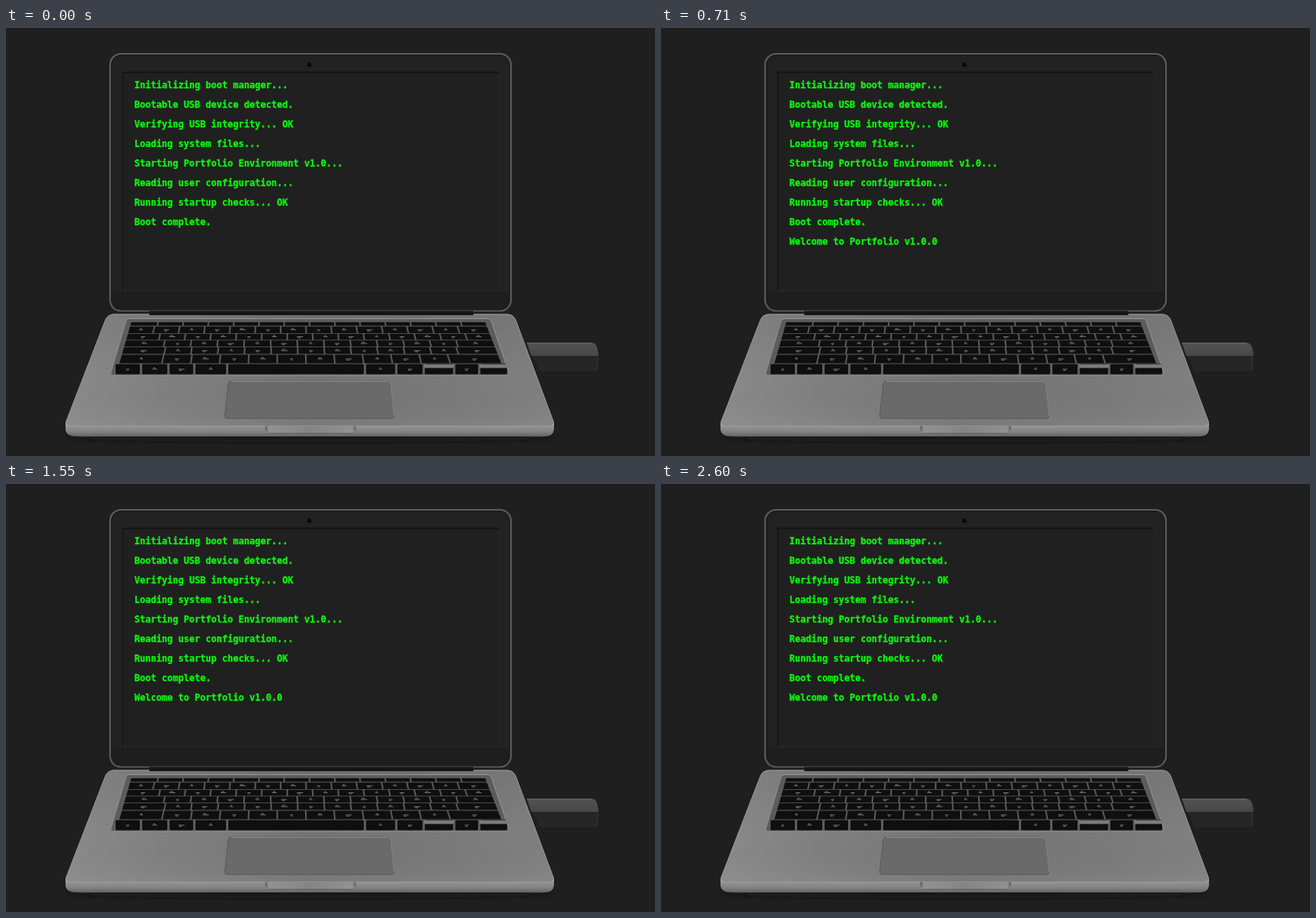
Recreate the animation shown at these times as an HTML page. Size 829x547 px, loop 2680 ms.

```html
<!DOCTYPE html>
<html lang="en">
<head>
<meta charset="utf-8">
<title>Boot screen</title>
<style>
html, body { margin: 0; width: 100%; height: 100%; overflow: hidden; background: #1f1f1f; }
svg { display: block; width: 829px; height: 547px; }
#console text {
  font: bold 11.63px "DejaVu Sans Mono", "Liberation Mono", monospace;
  fill: #0cf80c;
  stroke: #0cf80c;
  stroke-width: .3;
  white-space: pre;
}
</style>
</head>
<body>
<svg viewBox="0 0 829 547" xmlns="http://www.w3.org/2000/svg">
  <defs>
    <linearGradient id="metal">
      <stop offset="0" stop-color="#8a8a8a"/>
      <stop offset=".2" stop-color="#808080"/>
      <stop offset=".5" stop-color="#747474"/>
      <stop offset=".8" stop-color="#7a7a7a"/>
      <stop offset="1" stop-color="#818181"/>
    </linearGradient>
    <linearGradient id="shade" x2="0" y2="1">
      <stop offset="0" stop-color="#000" stop-opacity=".06"/>
      <stop offset=".6" stop-color="#000" stop-opacity="0"/>
      <stop offset="1" stop-color="#fff" stop-opacity=".05"/>
    </linearGradient>
    <linearGradient id="front" x2="0" y2="1">
      <stop offset="0" stop-color="#b0b0b0"/>
      <stop offset=".3" stop-color="#929292"/>
      <stop offset=".7" stop-color="#808080"/>
      <stop offset="1" stop-color="#626262"/>
    </linearGradient>
    <linearGradient id="notch">
      <stop offset="0" stop-color="#5d5d5d"/>
      <stop offset=".04" stop-color="#929292"/>
      <stop offset=".5" stop-color="#848484"/>
      <stop offset=".96" stop-color="#929292"/>
      <stop offset="1" stop-color="#5d5d5d"/>
    </linearGradient>
    <linearGradient id="stick" x2="0" y2="1">
      <stop offset="0" stop-color="#545454"/>
      <stop offset="1" stop-color="#474747"/>
    </linearGradient>
    <filter id="blur" x="-10%" y="-200%" width="120%" height="500%">
      <feGaussianBlur stdDeviation="4"/>
    </filter>
    <path id="deck" d="M138 365.5H640Q648 365.5 651 373L700 504V511H76V504L127 373Q130 365.5 138 365.5Z"/>
  </defs>

  <rect width="829" height="547" fill="#1f1f1f"/>
  <ellipse cx="388" cy="522" rx="315" ry="4" fill="#141414" filter="url(#blur)"/>

  <g id="usb">
    <path d="M672 417H757V433Q757 439 750 439H682Z" fill="#262626"/>
    <path d="M755 418V437" stroke="#343434"/>
    <path d="M660 402H747Q753 402 755 408L757 417Q757 419 754 419H670Z" fill="url(#stick)"/>
    <path d="M666 402.500H748" stroke="#666"/>
    <path d="M662 402H665L671 419H668Z" fill="#202020"/>
  </g>

  <g id="lid">
    <rect x="133" y="33" width="512" height="328.5" rx="14" fill="#222" stroke="#5a5a5a" stroke-width="2.2"/>
    <rect x="135" y="35" width="508" height="325" rx="12" fill="none" stroke="#161616"/>
    <path d="M136 337H642V350Q642 360 632 360H146Q136 360 136 350Z" fill="#1e1e1e"/>
    <rect x="149" y="56.500" width="481" height="279" fill="#202020" stroke="#292929"/>
    <path d="M149 336V56.500H630" fill="none" stroke="#121212" stroke-width="1.3"/>
    <circle cx="387.500" cy="47" r="2.700" fill="#080808"/>
  </g>

  <g id="base">
    <use href="#deck" fill="url(#metal)"/>
    <use href="#deck" fill="url(#shade)"/>
    <path d="M76.500 504L127 373Q130 366 138 366H640Q648 366 651 373L699.500 504" fill="none" stroke="#969696"/>
    <path d="M183 361.500H597V367H183Z" fill="#161616"/>
    <path d="M76 504Q77 508 84 508H693Q699 508 700 504V513Q699 522 688 522H90Q77 522 76 513Z" fill="url(#front)"/>
    <path d="M331 508.500H447V512Q446 518 438 518H340Q332 518 331 512Z" fill="url(#notch)"/>
    <path d="M336 518H442" stroke="#5c5c5c"/>
    <path d="M158 371.500H615Q619 371.500 620 375L642 440Q643 444 639 444H137Q133 444 134 440L153 375Q154 371.500 158 371.500Z" fill="#5c5c5c" stroke="#959595"/>
    <path d="M288 451H488Q491 451 491.500 454L496 495Q496 499 492 499H283Q279 499 279.500 495L284 454Q284.500 451 288 451Z" fill="#6a6a6a" stroke="#545454" stroke-width=".8"/>
    <path d="M288 451.500H488Q491 451.500 491.500 454L496 496" fill="none" stroke="#999" stroke-width=".8"/>
  </g>
  <g id="keys"></g>
  <g id="console"></g>
</svg>
<script>
const LOOP = 2680, WELCOME_AT = 710;
const NS = "http://www.w3.org/2000/svg";
const keys = document.getElementById("keys");
const terminal = document.getElementById("console");

function add(parent, tag, attrs) {
  const el = document.createElementNS(NS, tag);
  for (const k in attrs) el.setAttribute(k, attrs[k]);
  parent.appendChild(el);
  return el;
}

// Well edges lean outward toward the viewer.
const leftAt = y => 159 - (y - 376) * 19 / 66;
const rightAt = y => 613 + (y - 376) * 26 / 66;

// Draws a key between fractions a and b of the row; returns its centre.
function key(a, b, y, h) {
  const at = (u, v) => leftAt(v) + u * (rightAt(v) - leftAt(v));
  const pt = (u, v, d) => (at(u, v) + d).toFixed(1) + " " + v;
  add(keys, "path", {
    d: `M${pt(a, y, 1)}L${pt(b, y, -1)}L${pt(b, y + h, -1)}L${pt(a, y + h, 1)}Z`,
    fill: "#0f0f0f"
  });
  return (at(a, y + h / 2) + at(b, y + h / 2)) / 2;
}

function legend(x, y, n) {
  const w = 4 + n * 2 % 5;
  add(keys, "path", {
    d: `M${x - w / 2} ${y}h${w}m${-w + 1} ${n % 2 ? -1.5 : 1.5}h${w / 2}`,
    stroke: "#808080", "stroke-width": .9, fill: "none"
  });
}

// Each row: top, height, key count, first and last key width in units.
const rows = [
  [376, 4.6, 14, 1.1, 1], [381.5, 8.4, 14, 1, 1.2], [390.7, 7.7, 14, 1.3, 1],
  [399.2, 8, 13, 1.5, 1.4], [408, 8.6, 13, 1.6, 1.5], [417.4, 11, 12, 1.5, 1.8]
];
rows.forEach(([y, h, count, first, last], r) => {
  const total = count - 2 + first + last;
  let u = 0;
  for (let i = 0; i < count; i++) {
    const w = (i === 0 ? first : i === count - 1 ? last : 1) / total;
    const x = key(u, u + w, y, h);
    if (r) legend(x, y + h / 2, i + r * 3);
    u += w;
  }
});

const bottom = [[140, 171], [174, 206], [209, 239], [242, 281], [284, 457],
  [460, 497], [500, 532], [535, 571], [574, 603], [606, 640]];
bottom.forEach(([a, b], i) => {
  add(keys, "rect", { x: a, y: 429.5, width: b - a, height: 13, rx: 1.5, fill: "#0f0f0f" });
  if (i === 7 || i === 9)
    add(keys, "rect", { x: a - 1, y: 430, width: b - a + 2, height: 4.5, fill: "#7c7c7c" });
  else if (i !== 4) legend((a + b) / 2, 436, i);
});

const lines = [
  "Initializing boot manager...",
  "Bootable USB device detected.",
  "Verifying USB integrity... OK",
  "Loading system files...",
  "Starting Portfolio Environment v1.0...",
  "Reading user configuration...",
  "Running startup checks... OK",
  "Boot complete.",
  "Welcome to Portfolio v1.0.0"
].map((s, i) => {
  const el = add(terminal, "text", { x: 164, y: 77 + i * 25 });
  el.textContent = s;
  return el;
});
const welcome = lines[lines.length - 1];

function draw(t) {
  welcome.setAttribute("visibility", t < WELCOME_AT ? "hidden" : "visible");
}

const start = performance.now();
function tick(now) {
  draw(Math.max(0, now - start) % LOOP);
  requestAnimationFrame(tick);
}
draw(0);
requestAnimationFrame(tick);
</script>
</body>
</html>
```
